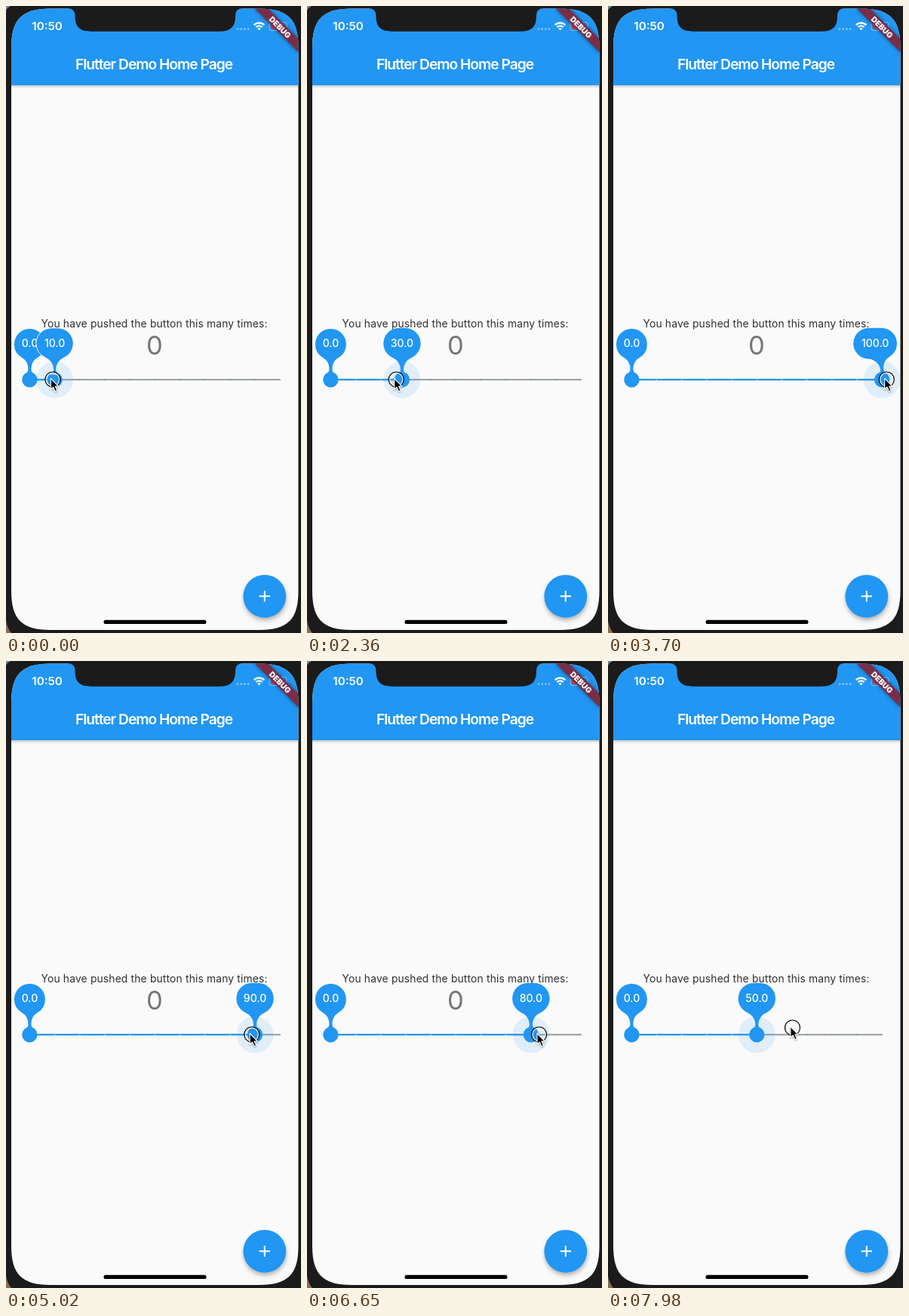
Animation of 391x831 px, one loop 8000 ms. Source, as an HTML page:

```html
<!DOCTYPE html>
<html lang="en">
<head>
<meta charset="utf-8">
<title>Range slider demo</title>
<style>
  html, body { margin: 0; width: 100%; height: 100%; overflow: hidden; background: #1b1b1c; }
  svg { display: block; width: 391px; height: 831px; }
  text { font-family: Inter, "Noto Sans", sans-serif; text-anchor: middle; }
  .blue { fill: #2196f3; }
  .white { fill: #fff; }
  .bar { filter: drop-shadow(0 2px 1.5px rgba(0, 0, 0, .2)); }
  .fab { filter: drop-shadow(0 3px 2px rgba(0, 0, 0, .14)) drop-shadow(1px 4px 3px rgba(0, 0, 0, .16)); }
  .label { font-size: 14px; font-weight: 500; }
  #track line { stroke-width: 2; }
</style>
</head>
<body>
<svg viewBox="0 0 391 831">
  <defs>
    <clipPath id="screen"><path id="outline"/></clipPath>
    <filter id="soft" x="-20%" y="-80%" width="140%" height="260%"><feGaussianBlur stdDeviation="2.5"/></filter>
  </defs>
  <rect width="391" height="831" fill="#1b1b1c"/>
  <path d="M0 0H6Q2 2 0 6Z" fill="#71899a"/>
  <path d="M0 815Q2 825 7 831H0Z" fill="#8a6d55"/>

  <g clip-path="url(#screen)">
    <rect width="391" height="831" fill="#fafafa"/>
    <rect class="bar blue" width="391" height="105"/>
    <text class="white" x="196" y="83.5" font-size="19.2" font-weight="600" letter-spacing="-1">Flutter Demo Home Page</text>
    <text class="white" x="54.6" y="32.4" font-size="15.2" font-weight="600">10:50</text>

    <path d="M307 30.5H322" stroke="#fff" stroke-opacity=".4" stroke-width="3"
      stroke-linecap="round" stroke-dasharray="0 4.7"/>
    <g fill="none" stroke="#fff" stroke-width="2.2">
      <path d="M328.7 25.2A9.6 9.6 0 0 1 342.3 25.2M331.3 28A6 6 0 0 1 339.7 28"/>
      <path d="M335.5 32.3L333.2 29.9Q335.5 28 337.8 29.9Z" fill="#fff" stroke="none"/>
    </g>
    <rect x="349" y="21.5" width="23" height="11" rx="3" fill="none" stroke="#fff" stroke-opacity=".45"/>
    <rect x="351" y="23.5" width="6" height="7" rx="1.5" fill="#f03a3a"/>

    <g transform="translate(387.5 4) rotate(45)">
      <rect x="-41" y="28" width="82" height="12.3" opacity=".5" filter="url(#soft)"/>
      <rect x="-41" y="28" width="82" height="12.3" fill="#792e48"/>
      <text class="white" x="0" y="38" font-size="10.2" font-weight="900">DEBUG</text>
    </g>

    <text x="196.6" y="425.6" font-size="13.8" letter-spacing=".18" fill="#2f2f2f">You have pushed the button this many times:</text>
    <text x="196.8" y="462" font-size="34.5" fill="#757575">0</text>

    <circle class="fab blue" cx="342.8" cy="782.3" r="28.4"/>
    <path d="M335.6 782.3H350M342.8 775.1V789.5" stroke="#fff" stroke-width="2"/>
    <rect x="129.5" y="813.8" width="136" height="5.2" rx="2.6"/>
  </g>
  <path d="M82 3Q91.5 3.5 91.5 13C91.5 27 97 33.7 113 33.7H282.5C298.5 33.7 304 27 304 13Q304 3.5 313 3Z" fill="#1b1b1c"/>

  <g id="track">
    <line x1="31" x2="363.2" y1="495.3" y2="495.3" stroke="#979c9c"/>
    <line id="active" x1="31" y1="495.3" y2="495.3" stroke="#2196f3"/>
  </g>
  <circle id="ripple" class="blue" cy="495.3" r="24.3" opacity=".12"/>
  <g id="ticks"></g>
  <circle class="blue" cx="31.4" cy="495.3" r="10.2"/>
  <circle id="thumb" class="blue" cy="495.3" r="10.2"/>
  <path id="lowBubble" class="blue"/>
  <text class="label white" x="31.5" y="452.4">0.0</text>
  <path id="bubble" class="blue" stroke-width=".9"/>
  <text id="label" class="label white" y="451.5"></text>

  <g id="cursor" fill="none">
    <circle r="9" stroke="#fff" stroke-width="2" stroke-opacity=".85"/>
    <circle r="10" stroke="#000" stroke-width="1.2"/>
    <path d="M-2.6 -1.5V13L.7 10L3.3 15.8L5.8 14.7L3.3 9.1H7.6Z"
      fill="#000" stroke="#fff" stroke-width="1.1" stroke-linejoin="round"
      style="filter: drop-shadow(0 1px 1px rgba(0,0,0,.35))"/>
  </g>
</svg>

<script>
const LOOP = 8000, FIRST = 586, STEP = 147.6;
const MIN_X = 31.4, GAP = 33.18, RADIUS = 20.5;
const $ = id => document.getElementById(id);
const set = (el, attrs) => { for (const key in attrs) el.setAttribute(key, attrs[key]); };
const mix = (a, b, f) => a + (b - a) * f;
const smooth = f => f * f * (3 - 2 * f);

// Turning points of the drag: [step, x], eased in between
const drag = [
  [-1, 62], [2, 74.5], [5, 78], [12, 118.3], [13, 185], [18, 371],
  [21, 369.3], [22, 342], [25, 342], [30, 325.8], [41, 307.6], [49, 205], [50, 244.5]
];

function pointerX(step) {
  const i = Math.max(1, drag.findIndex(p => p[0] >= step));
  const [[k0, x0], [k1, x1]] = [drag[i - 1], drag[i]];
  return mix(x0, x1, smooth(Math.max(0, step - k0) / (k1 - k0)));
}

// The slider snaps to the nearest division one step behind the pointer
const division = step =>
  Math.min(10, Math.max(0, Math.round((pointerX(step - 1) - MIN_X) / GAP)));

// Screen with continuous corners
function roundedScreen(l, t, r, b, size, pull) {
  return `M${l + size} ${t}H${r - size}C${r - pull} ${t} ${r} ${t + pull} ${r} ${t + size}` +
    `V${b - size}C${r} ${b - pull} ${r - pull} ${b} ${r - size} ${b}` +
    `H${l + size}C${l + pull} ${b} ${l} ${b - pull} ${l} ${b - size}` +
    `V${t + size}C${l} ${t + pull} ${l + pull} ${t} ${l + size} ${t}Z`;
}

// Rounded lobe around a center, joined to the thumb by a concave neck
function paddle(x, center, halfWidth, cy) {
  const r = RADIUS, neck = 17, half = 2, spread = halfWidth - r;
  const a = center - spread, b = center + spread;
  const side = (lobeX, dir) => {
    const dx = x + dir * (neck + half) - lobeX, f = r / (r + neck);
    const dy = Math.sqrt((r + neck) ** 2 - dx * dx);
    return { x: lobeX + dx * f, y: cy + dy * f, low: Math.min(cy + dy, 483) };
  };
  const l = side(a, -1), m = side(b, 1);
  return `M${x - 6} 488Q${x - half} 486 ${x - half} ${l.low}A${neck} ${neck} 0 0 0 ${l.x} ${l.y}` +
    `A${r} ${r} 0 0 1 ${a - r} ${cy}A${r} ${r} 0 0 1 ${a} ${cy - r}H${b}` +
    `A${r} ${r} 0 0 1 ${b + r} ${cy}A${r} ${r} 0 0 1 ${m.x} ${m.y}` +
    `A${neck} ${neck} 0 0 0 ${x + half} ${m.low}Q${x + half} 486 ${x + 6} 488Z`;
}

const ticks = Array.from({ length: 11 }, (_, i) => {
  const dot = document.createElementNS("http://www.w3.org/2000/svg", "circle");
  set(dot, { cx: MIN_X + i * GAP, cy: 495.3, r: 1 });
  return $("ticks").appendChild(dot);
});
set($("outline"), { d: roundedScreen(7, 3.5, 387.5, 827, 52, 14) });
set($("lowBubble"), { d: paddle(MIN_X, MIN_X, RADIUS, 448.3) });

function draw(time) {
  const step = Math.max(-1, Math.floor((time - FIRST) / STEP));
  const now = division(step);
  const x = MIN_X + GAP * mix(division(step - 1), now, .85);
  const text = (now * 10).toFixed(1);
  const halfWidth = RADIUS + 4.2 * (text.length - 3);
  const center = Math.min(x, 383 - halfWidth);
  const overlaps = center - halfWidth < MIN_X + RADIUS;

  set($("active"), { x2: x });
  set($("ripple"), { cx: x });
  set($("thumb"), { cx: x });
  set($("bubble"), { d: paddle(x, center, halfWidth, 447.3), stroke: overlaps ? "#fff" : "none" });
  set($("label"), { x: center });
  $("label").textContent = text;
  ticks.forEach((dot, i) => set(dot, i < now
    ? { fill: "#fff", opacity: .4 } : { fill: "#2196f3", opacity: .55 }));

  const lift = 9 * Math.max(0, step - 49);
  set($("cursor"), { transform: `translate(${pointerX(step)} ${495 - lift})` });
}

const start = performance.now();
function tick() {
  draw((performance.now() - start) % LOOP);
  requestAnimationFrame(tick);
}
tick();
</script>
</body>
</html>
```
